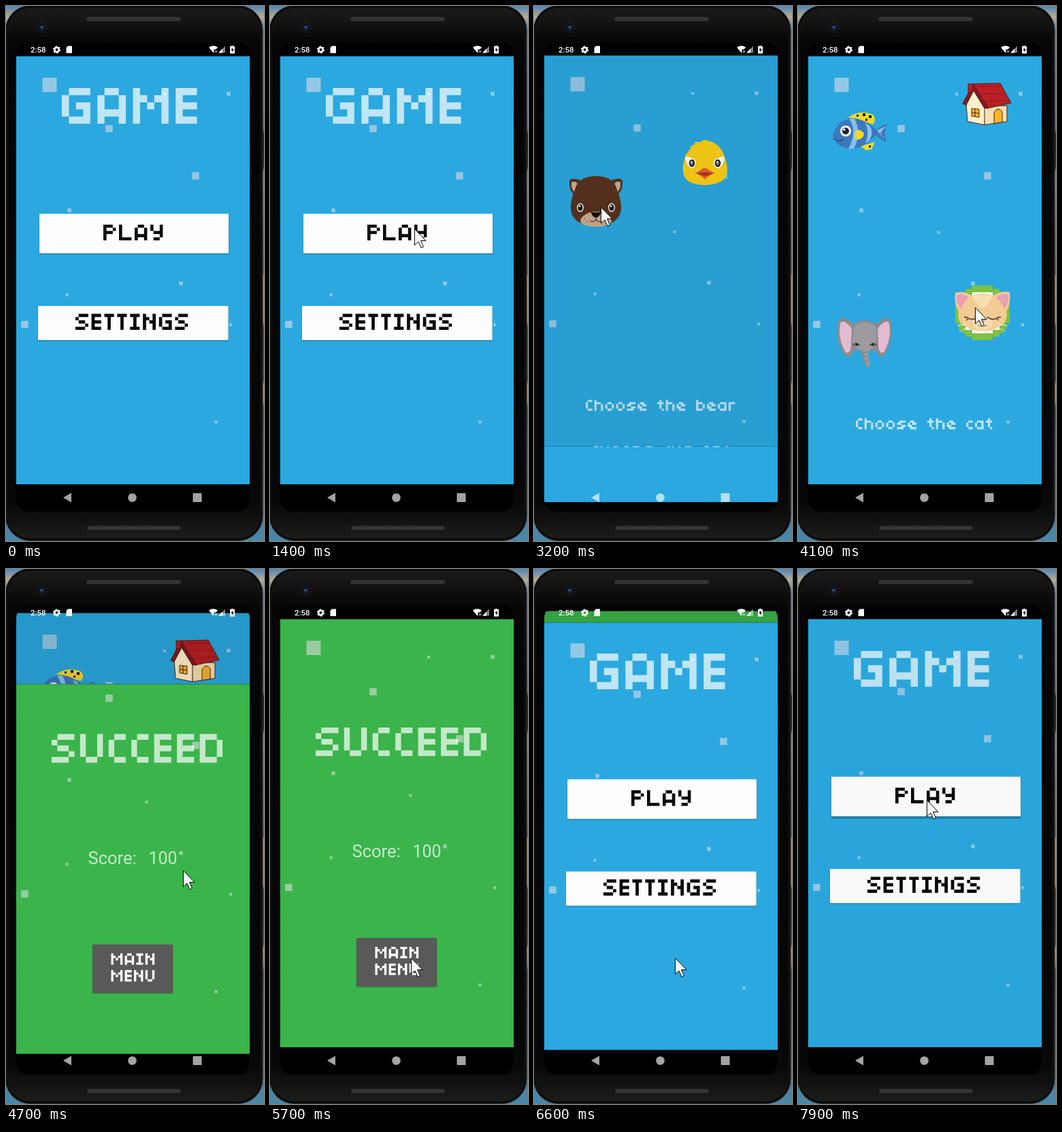
An HTML page for the animation above (8 s loop, 379x783 px).

```html
<!DOCTYPE html>
<html lang="en">
<head>
<meta charset="utf-8">
<title>Choose the animal</title>
<style>
  html, body { margin: 0; width: 100%; height: 100%; overflow: hidden; background: #000; }
  svg { display: block; width: 379px; height: 783px; }
  .px { fill: none; stroke-width: 1; stroke-linecap: square; }
  .off { display: none; }
  text { font-family: Roboto, sans-serif; }
</style>
</head>
<body>
<svg viewBox="0 0 379 783" xmlns="http://www.w3.org/2000/svg">
  <defs>
    <linearGradient id="wall" x2="0" y2="1">
      <stop offset="0" stop-color="#4f86b8"/><stop offset=".02" stop-color="#b9a98c"/>
      <stop offset=".04" stop-color="#5c8db8"/><stop offset=".23" stop-color="#4a7a9c"/>
      <stop offset=".24" stop-color="#222"/><stop offset=".3" stop-color="#333"/>
      <stop offset=".31" stop-color="#7191a8"/><stop offset=".5" stop-color="#56707c"/>
      <stop offset=".505" stop-color="#e0912c"/><stop offset=".59" stop-color="#d98a28"/>
      <stop offset=".6" stop-color="#4d4a44"/><stop offset=".7" stop-color="#5b5144"/>
      <stop offset=".71" stop-color="#e39a35"/><stop offset=".74" stop-color="#c98432"/>
      <stop offset=".75" stop-color="#3f5f7a"/><stop offset="1" stop-color="#4a88a8"/>
    </linearGradient>
    <linearGradient id="body" x2="0" y2="1">
      <stop offset="0" stop-color="#1b1b1a"/><stop offset=".07" stop-color="#050505"/>
      <stop offset=".93" stop-color="#070707"/><stop offset="1" stop-color="#1c1c1b"/>
    </linearGradient>
    <clipPath id="screenClip"><rect x="15" y="54" width="343" height="686" rx="18"/></clipPath>
    <clipPath id="reveal"><rect id="revealBox" x="15" y="54" width="343" height="686"/></clipPath>
    <g id="dots" fill="#ebe1eb" fill-opacity=".54"></g>
    <g id="eye">
      <ellipse rx="5" ry="6.5" fill="#fff"/><ellipse rx="3.6" ry="5" fill="#16120f"/>
      <circle cx="-1" cy="-2" r="1.4" fill="#fff"/>
    </g>
    <g id="duckEye">
      <ellipse rx="4.200" ry="5.500" fill="#1d1a18"/><ellipse rx="2.300" ry="3.500" fill="#77736c"/>
      <circle cx="-.8" cy="-1.500" r="1.300" fill="#fff"/>
    </g>
  </defs>

  <rect width="379" height="783" fill="url(#wall)"/>
  <rect x="-.5" y="-.5" width="377.500" height="783" rx="36" fill="#090909" stroke="#2a2926"/>
  <rect x="2" y="3" width="372.500" height="776" rx="34" fill="url(#body)" stroke="#191918"/>
  <g fill="#343331" stroke="#171716">
    <rect x="117.500" y="15.500" width="140" height="7" rx="3.500"/>
    <rect x="118.500" y="760.500" width="139" height="7" rx="3.500"/>
  </g>
  <circle cx="53.500" cy="31.500" r="7" fill="#11131a" stroke="#1e1f22"/>
  <circle cx="53" cy="31.500" r="3" fill="#1c2a52"/><circle cx="52" cy="31" r="1.200" fill="#4565ac"/>

  <g clip-path="url(#screenClip)">
    <rect x="15" y="54" width="343" height="686"/>
    <g id="pages">
      <g id="menu" data-bg="#2ba8df">
        <g id="play" data-box="49 304 278 58" fill="#fdfdfd"></g>
        <g data-box="47 439 279.5 50" fill="#fdfdfd"></g>
      </g>

      <g id="bear" data-bg="#2ba8df">
        <g>
          <path fill="#57331f" d="M52 258Q53 253 60 254Q70 255 75 261L62 279Q51 273 52 258ZM130 258Q129 253 122 254Q112 255 107 261L120 279Q131 273 130 258Z"/>
          <path fill="#cfac92" d="M55 259Q61 256 65 263L61 275Q54 269 55 259ZM127 259Q121 256 117 263L121 275Q128 269 127 259Z"/>
          <path fill="#57331f" d="M91 250C109 250 119 257 122 270C125 278 128 286 128 296C128 313 114 323 91 323S54 313 54 296C54 286 57 278 60 270C63 257 73 250 91 250Z"/>
          <path fill="#c8ab90" d="M91 302C103 302 114 309 114 316C112 322 103 324 91 324S70 322 68 316C68 309 79 302 91 302Z"/>
          <path d="M84 303H98Q98 308 91 311Q84 308 84 303Z" fill="#17110e"/>
          <path d="M91 310V314Q86 319 82 315M91 314Q96 319 100 315" fill="none" stroke="#2a1b12"/>
          <path d="M74 312h1M77 317h1M105 317h1M108 312h1" stroke="#6b4a36" stroke-width="1.500"/>
          <use href="#eye" x="68" y="296"/><use href="#eye" x="114" y="296"/>
        </g>
        <g>
          <path fill="#fbd016" d="M229 207L237 203L235 200L245 200L249 197Q272 199 279 219Q290 246 276 257Q266 263 251 263T226 257Q213 246 223 219L231 208Z"/>
          <path fill="#fff" d="M222 221Q233 222 238 228Q238 238 231 239Q223 235 222 221ZM280 221Q269 222 264 228Q264 238 271 239Q279 235 280 221Z"/>
          <use href="#duckEye" x="232" y="231"/><use href="#duckEye" x="270" y="231"/>
          <path fill="#e7672c" d="M236 245Q243 243 247 239Q251 237 255 239Q259 243 266 245Q256 249 251 255Q246 249 236 245Z"/>
          <path fill="#b53722" d="M239 246Q251 242 263 246Q256 249 251 250Q246 249 239 246Z"/>
        </g>
      </g>

      <g id="cat" data-bg="#2ba8df">
        <g>
          <path fill="#f3d928" d="M74 163Q91 151 110 159Q116 166 110 173L88 167ZM92 205L113 199L108 210L100 211Z"/>
          <path fill="#171a28" d="M86 159h3v3h-3zM95 157h4v4h-4zM104 160h4v4h-4zM99 165h3v3h-3zM104 204h3v3h-3z"/>
          <path fill="#3d78bd" d="M51 190Q57 166 81 164Q100 166 115 181Q123 174 131 173Q125 185 130 199Q121 196 114 189Q100 207 78 209Q58 207 54 196Z"/>
          <path fill="#84c2ea" d="M75 165Q88 183 74 209L82 209Q94 186 83 165ZM98 171Q106 183 99 201L105 197Q112 185 105 175ZM116 182L129 176L121 186L127 195Z"/>
          <path fill="#f3d928" d="M83 187Q86 179 91 182Q100 185 95 192Q89 198 84 194Z"/>
          <path d="M52 194Q59 200 67 195" fill="none" stroke="#234f87" stroke-width="1.500"/>
          <circle cx="70" cy="183" r="8" fill="#fff"/><circle cx="70" cy="183" r="5" fill="#172036"/><circle cx="68" cy="181" r="1.700" fill="#fff"/>
        </g>
        <g stroke="#4d2018" stroke-width="1" stroke-linejoin="round">
          <path fill="#fff1cb" d="M247 142L257 121L275 146L274 174L249 169Z"/>
          <path fill="#f8dfad" d="M274 146H307V169L274 174Z"/>
          <path fill="#ba2025" d="M257 114L297 113L313 142L277 150Z"/>
          <path fill="#87181d" d="M257 114L242 143L247 145L258 124L274 150L279 148Z"/>
          <path fill="#ba2025" d="M250 114H257V124L250 127Z"/>
          <path fill="#f4b52b" d="M255 150L266 151V163L255 161ZM260 150V162M255 156L266 157M288 172V156Q294 146 300 155V170Z"/>
          <path d="M264 118L300 117M270 128L306 129M274 139L311 138" fill="none" stroke="#8f171c"/>
        </g>
        <g>
          <path fill="#8b8b90" d="M82 466Q68 451 60 460Q55 471 59 489Q63 507 72 514Q80 513 82 504L93 505Q98 529 103 530Q108 526 104 517L102 505L114 504Q116 513 124 514Q133 505 136 488Q140 469 135 459Q127 452 114 466Q98 454 82 466Z"/>
          <path fill="#e2bcd0" d="M79 472Q66 456 62 465Q58 486 70 507Q78 510 78 493ZM117 472Q130 456 134 465Q138 486 126 507Q118 510 118 493Z"/>
          <path fill="#9b9ba0" d="M82 470Q98 456 114 470Q119 493 108 502Q101 504 104 515Q107 527 103 528Q97 522 95 504Q84 503 80 492Z"/>
          <path d="M93 508L102 506M95 514L103 512M98 520L104 518" stroke="#77777c"/>
          <path d="M81 496Q85 491 90 496ZM106 496Q111 491 115 496Z" fill="#fff" stroke="#333" stroke-width="1.200"/>
          <circle cx="86" cy="495.500" r="2" fill="#222"/><circle cx="110" cy="495.500" r="2" fill="#222"/>
        </g>
        <g id="ring" shape-rendering="crispEdges"></g>
        <g>
          <path fill="#f3cb94" d="M231 420Q243 416 256 424Q271 417 286 424Q299 416 311 419Q313 434 306 447Q309 459 300 467Q288 476 271 476T242 467Q233 459 236 447Q229 435 231 420Z"/>
          <path fill="#e9a0b2" d="M233 423Q243 420 251 427Q242 434 239 444Q231 433 233 423ZM309 422Q299 420 291 427Q300 434 303 444Q311 433 309 422Z"/>
          <path fill="#f8ddb1" d="M256 426Q271 418 286 426Q276 441 271 443Q266 441 256 426ZM256 461Q271 453 286 461Q287 473 271 475Q255 473 256 461Z"/>
          <path d="M247 455Q256 462 264 455M278 455Q286 462 295 455M248 456L244 455M250 458L247 460M294 456L298 455M292 458L295 460" fill="none" stroke="#49382d" stroke-width="1.500"/>
          <path d="M267 460H275L271 464Z" fill="#d97f88"/>
          <path d="M271 464V467Q267 470 264 467M271 467Q275 470 278 467" fill="none" stroke="#8b6148"/>
          <path d="M250 465L234 468M251 469L237 477M292 465L308 468M291 469L305 477" stroke="#fff" stroke-width=".8"/>
        </g>
      </g>

      <g id="won" data-bg="#3bb44c">
        <g fill="#c6e9ca" font-size="25">
          <text x="120.500" y="422" font-size="25.500">Score:</text><text x="209.500" y="422">100</text>
        </g>
        <g id="main" data-box="127 540 118 71" fill="#595959"></g>
      </g>
    </g>

    <g fill="#fff">
      <text x="36" y="68" font-size="11.500" font-weight="500">2:58</text>
      <circle cx="74.500" cy="64" r="3.200" fill="none" stroke="#fff" stroke-width="2.600"/>
      <circle cx="74.500" cy="64" r="4.800" fill="none" stroke="#fff" stroke-width="1.600" stroke-dasharray="2.500 2.530"/>
      <path d="M91 58.500H97V69H88.500V61Z"/>
      <path d="M298 60.500Q304.500 56 311 60.500L308.500 63.500H305.500V67.500L304.500 68.500Z"/>
      <path d="M307 65L310 68M310 65L307 68" stroke="#fff"/>
      <path d="M322 58.500V68.500H312Z" fill-opacity=".5"/><path d="M318 62.500V68.500H312Z"/>
      <path d="M331 58H334V59H336V69.500H329V59H331Z"/>
      <path d="M333 60.500L330.500 65H332.500V68L334.800 63.500H333Z" fill="#000"/>
    </g>
    <g fill="#fff" fill-opacity=".64">
      <path d="M84 719.500L96 712.500V726.500Z"/><circle cx="185.500" cy="719.500" r="6.300"/><rect x="274.500" y="713" width="13" height="13" rx="1"/>
    </g>
  </g>
  <path id="cursor" d="M.5 .5V24L6 19L10 28L13.500 26.500L9.500 17.500H17Z" fill="#fff" stroke="#000" stroke-linejoin="round"/>
</svg>

<script>
const $ = id => document.getElementById(id);
const LOOP = 8000, STEP = 100;
const TOP = 54, TALL = 686, BAR = 73.5;

function add(parent, tag, attrs) {
  const el = document.createElementNS('http://www.w3.org/2000/svg', tag);
  for (const k in attrs) el.setAttribute(k, attrs[k]);
  parent.append(el);
  return el;
}
const rect = (parent, x, y, width, height, more) => add(parent, 'rect', { x, y, width, height, ...more });

// Pixel lettering: width in cells, then strokes through cell centres, five rows high
const GLYPHS = {
  A: [4, 'M1 0H2M0 4V1M3 1V4M0 3H3'], C: [3, 'M2 0H1M0 1V3M1 4H2'],
  D: [4, 'M2 0H0V4H2M3 1V3'], E: [3, 'M2 0H0V4H2M0 2H2'],
  G: [4, 'M3 0H1M0 1V3M1 4H3V2H2'], I: [3, 'M0 0H2M1 0V4M0 4H2'],
  L: [4, 'M0 0V4H3'], M: [5, 'M0 4V0M4 0V4M1 1h0M3 1h0M2 2h0'],
  N: [4, 'M0 4V0M3 0V4M1 1h0M2 2h0'], P: [4, 'M0 4V0H2M3 1h0M2 2H0'],
  S: [4, 'M3 0H1M0 1h0M1 2H2M3 3h0M2 4H0'], T: [3, 'M0 0H2M1 0V4'],
  U: [4, 'M0 0V3M3 0V3M1 4H2'], Y: [4, 'M0 0V1M3 0V3M1 2H3M2 4H1'],
  a: [4, 'M1 1H3V4H1M0 2V3'], b: [4, 'M0 0V4H2M0 1H2M3 2V3'],
  c: [3, 'M1 1H2M0 2V3M1 4H2'], e: [4, 'M1 1H2M0 2V3M2 2H3M0 3H1M1 4H3'],
  h: [4, 'M0 0V4M0 1H2M3 2V4'], o: [4, 'M1 1H2M0 2V3M3 2V3M1 4H2'],
  r: [3, 'M0 1V4M0 1H2'], s: [4, 'M1 1H3M0 2H1M2 3H3M0 4H2'],
  t: [3, 'M1 0V3M0 1H2M2 4h0'], ' ': [3, '']
};

function label(page, text, x, y, cell, stroke, opacity = 1) {
  const g = add($(page), 'g', {
    class: 'px', role: 'img', 'aria-label': text, stroke, opacity,
    transform: `translate(${x} ${y}) scale(${cell}) translate(.5 .5)`
  });
  let col = 0;
  for (const ch of text) {
    const [w, d] = GLYPHS[ch];
    add(g, 'path', { d, transform: `translate(${col})` });
    col += w + 1;
  }
}

// Floating squares: centre x, centre y, size
for (const [x, y, s] of [
  [64, 115.5, 21], [327, 128.5, 5.5], [151.5, 179.5, 10.5], [278.5, 248.5, 10.5],
  [233, 129, 4], [93, 299, 5.5], [206.5, 331.5, 4], [257, 406, 5.5],
  [89.5, 422.5, 4], [27.5, 466, 10.5], [330, 466.5, 4], [308.5, 609, 4]
]) rect($('dots'), x - s / 2, y - s / 2, s, s);

for (const page of [...$('pages').children]) {
  const back = add(page, 'g', {});
  rect(back, 15, TOP, 343, TALL);
  rect(back, 15, BAR, 343, 700 - BAR, { fill: page.dataset.bg });
  add(back, 'use', { href: '#dots' });
  page.prepend(back);
}

for (const b of document.querySelectorAll('[data-box]')) {
  const [x, y, w, h] = b.dataset.box.split(' ').map(Number);
  const dark = { fill: '#000', rx: 1 };
  b.lift = rect(b, x, y + 2, w, h + 2, { ...dark, opacity: .18 });
  rect(b, x - .5, y + .5, w + 1, h + 1, { ...dark, opacity: .2 });
  rect(b, x, y, w, h, { rx: 1 });
  b.shade = rect(b, x, y, w, h, { ...dark, opacity: .1 });
}

// Pixel disc behind the cat
for (let i = 0; i < 16; i++) for (let j = 0; j < 16; j++) {
  const r = Math.hypot(i - 7.5, j - 7.5);
  if (r < 8.1) rect($('ring'), 231 + i * 5, 409 + j * 5, 5, 5, { fill: r < 6.4 ? '#fff' : '#7fc241' });
}

label('menu', 'GAME', 82, 120, 10.45, '#fff', .7);
label('menu', 'PLAY', 143, 320, 4.6, '#0a0a0a');
label('menu', 'SETTINGS', 102, 450.5, 4.72, '#0a0a0a');
label('bear', 'Choose the bear', 76, 577.5, 3.18, '#fff', .7);
label('cat', 'Choose the cat', 85, 603.5, 3.18, '#fff', .7);
label('won', 'SUCCEED', 67, 232, 8.37, '#fff', .7);
label('won', 'MAIN', 154.5, 553, 3.35, '#fff');
label('won', 'MENU', 154.5, 577.5, 3.35, '#fff');

// Start time, leaving page, arriving page
const MOVES = [
  [1550, 'menu', 'bear'], [3134, 'bear', 'cat'], [4520, 'cat', 'won'],
  [6350, 'won', 'menu'], [7880, 'menu', 'bear']
];
const CURSOR = [
  [200, 339, 122], [900, 212, 326], [1600, 212, 326], [2000, 137, 310],
  [2400, 99, 295], [2600, 99, 295], [2700, 98, 294], [3500, 98, 294],
  [4000, 259, 440], [4100, 260, 441], [5100, 260, 441], [5700, 207, 569],
  [6600, 207, 569], [7100, 189, 363], [7400, 189, 338]
];

// cubic-bezier(.4, 0, .2, 1)
function ease(x) {
  if (x >= 1) return 1;
  let lo = 0, hi = 1;
  for (let i = 0; i < 24; i++) {
    const s = (lo + hi) / 2, q = 1 - s;
    if (1.2 * q * q * s + .6 * q * s * s + s ** 3 < x) lo = s; else hi = s;
  }
  return 3 * (1 - lo) * lo * lo + lo ** 3;
}

const shift = (el, y) => el.setAttribute('transform', `translate(0 ${y.toFixed(1)})`);
const show = (el, on) => el.classList.toggle('off', !on);

function drawPages(t) {
  const move = MOVES.filter(m => m[0] <= t).pop() || [-1000, 'won', 'menu'];
  const dt = t - move[0], out = $(move[1]), into = $(move[2]), moving = dt < 425;
  for (const page of $('pages').children) show(page, page === into || (moving && page === out));
  if ($('pages').lastElementChild !== into) $('pages').append(into);

  const p = ease(dt / 425);
  shift(out, -.02 * TALL * p);
  out.setAttribute('opacity', 1 - .1 * Math.min(1, dt / 117));
  out.removeAttribute('clip-path');

  shift(into, Math.abs(1 - p) < .015 ? 0 : .041 * TALL * (1 - p));
  into.setAttribute('opacity', 1);
  const cut = .959 * TALL * (1 - ease(dt / 322));
  $('revealBox').setAttribute('y', TOP + cut);
  $('revealBox').setAttribute('height', TALL - cut);
  if (moving) into.setAttribute('clip-path', 'url(#reveal)');
  else into.removeAttribute('clip-path');
}

function drawCursor(t) {
  show($('cursor'), t >= CURSOR[0][0]);
  const n = CURSOR.findIndex(k => k[0] > t);
  let [a, x, y] = CURSOR.at(n < 0 ? -1 : Math.max(0, n - 1));
  if (n > 0) {
    const [b, x2, y2] = CURSOR[n], f = (t - a) / (b - a);
    x += (x2 - x) * f;
    y += (y2 - y) * f;
  }
  $('cursor').setAttribute('transform', `translate(${x.toFixed(1)} ${y.toFixed(1)})`);
}

function drawPresses(t) {
  const within = (a, b) => t >= a && t < b;
  show($('play').shade, within(1100, 1200));
  show($('play').lift, within(1100, 1400) || t >= 7600);
  show($('main').shade, within(6000, 6100));
  show($('main').lift, within(6000, 6300));
}

for (const b of document.querySelectorAll('[data-box]')) { show(b.shade, false); show(b.lift, false); }

const start = performance.now();
function frame() {
  const t = Math.floor((performance.now() - start) % LOOP / STEP) * STEP;
  drawPages(t);
  drawCursor(t);
  drawPresses(t);
  requestAnimationFrame(frame);
}
frame();
</script>
</body>
</html>
```
